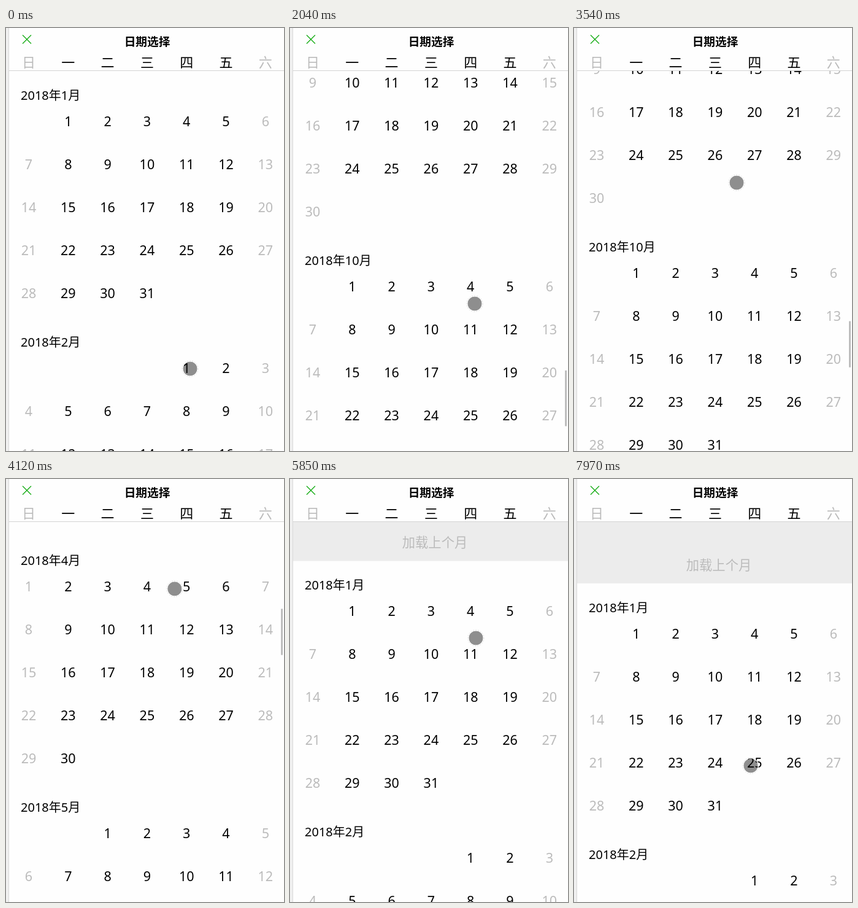
An HTML page with a canvas that plays this animation: 453x689 px, repeating every 8 s.

```html
<!DOCTYPE html>
<html lang="zh">
<head>
<meta charset="utf-8">
<title>日期选择</title>
<style>
html, body { margin: 0; width: 100%; height: 100%; overflow: hidden; background: #fefefe; }
canvas { display: block; width: 453px; height: 689px; }
</style>
</head>
<body>
<canvas id="stage"></canvas>
<script>
const W = 453, H = 689, TOP = 70, VIEW = H - TOP, LOOP = 8000;
const ROW = 70, MONTH_PAD = 52;
const CJK = '"Noto Sans CJK SC Light", "Noto Sans CJK SC", "Noto Sans CJK", sans-serif';
const BOLD = '"Noto Sans CJK SC", "Noto Sans CJK", sans-serif';
const FONT = `"Noto Sans", ${CJK}`;
const BG = '#fefefe', INK = '#000', PALE = '#bbb';

const canvas = document.getElementById('stage');
const ctx = canvas.getContext('2d');
const ratio = window.devicePixelRatio || 1;
canvas.width = W * ratio;
canvas.height = H * ratio;
ctx.scale(ratio, ratio);

const clamp = (v, lo, hi) => Math.min(hi, Math.max(lo, v));
const wave = p => Math.sin(Math.PI * p) ** 2;
const ease = p => wave(clamp(p, 0, 1) / 2);
const lerp = (a, b, p) => a + (b - a) * p;

// Long flings: down the list, settle, slow drag, back to the top
function flings(t) {
  if (t < 2300) return 3683 * ease((t - 800) / 1500);
  if (t < 2600) return lerp(3683, 3490, ease((t - 2300) / 300));
  if (t < 3550) return lerp(3490, 3441, ease((t - 2600) / 950));
  return 3441 * (1 - ease((t - 3550) / 950));
}

// Pulls past the top edge
const PULLS = [
  { at: 600, depth: 25 },
  { at: 4900, depth: 46 },
  { at: 5850, depth: 63.5 },
  { at: 6980, depth: 50 },
  { at: 7970, depth: 100 }
];
const PULL_TIME = 475;

function scrollAt(t) {
  const pulled = PULLS.reduce((sum, p) =>
    sum + p.depth * (1 - ease(Math.abs(t - p.at) / PULL_TIME)), 0);
  return flings(t) - pulled;
}

// Finger stops, with the number of swipes made on the way to the next
const STOPS = [
  { at: 120, x: 300, y: 555, swipes: 5 },
  { at: 2040, x: 301, y: 449, swipes: 1 },
  { at: 3540, x: 265, y: 252, swipes: 4 },
  { at: 4900, x: 288, y: 245, swipes: 1 },
  { at: 5850, x: 303, y: 259, swipes: 1 },
  { at: 6980, x: 282, y: 207, swipes: 1 },
  { at: 7970, x: 288, y: 467 }
];

function touchAt(t) {
  const i = Math.max(1, STOPS.findIndex(s => s.at >= Math.min(t, 7970)));
  const a = STOPS[i - 1], b = STOPS[i];
  const p = clamp((t - a.at) / (b.at - a.at), 0, 1);
  return {
    x: lerp(a.x, b.x, p),
    y: lerp(a.y, b.y, ease(p)) * (1 - 0.45 * wave(a.swipes * p))
  };
}

const months = [];
let total = 0;
for (let m = 0; m < 12; m++) {
  const first = new Date(2018, m, 1).getDay();
  const days = new Date(2018, m + 1, 0).getDate();
  const height = MONTH_PAD + ROW * Math.ceil((first + days) / 7);
  months.push({ name: `2018年${m + 1}月`, first, days, y: total, end: total + height });
  total += height;
}

function loadedMonths(t, scroll) {
  if (t < 2300) return clamp(Math.floor(scroll / 402) + 2, 3, 12);
  return t < 4400 ? 12 : 3;
}

const colX = c => 37 + c * 64.3;
const colInk = c => c % 6 ? INK : PALE;

function text(str, x, y, font, color = INK, align = 'center') {
  ctx.font = font;
  ctx.fillStyle = color;
  ctx.textAlign = align;
  ctx.fillText(str, x, y);
}

function rect(x, y, w, h, color) {
  ctx.fillStyle = color;
  ctx.fillRect(x, y, w, h);
}

function drawList(scroll, count) {
  if (scroll < 0) {
    rect(5, TOP, W - 5, -scroll, '#ececec');
    text('加载上个月', 236, Math.round(TOP - scroll - 22), `300 21.3px ${CJK}`, PALE);
  }
  for (const m of months.slice(0, count)) {
    const y = Math.round(110 + m.y - scroll);
    if (y > H + 20 || y + m.end - m.y < TOP - 20) continue;
    text(m.name, 24, y + 7, `20px ${FONT}`, INK, 'left');
    for (let d = 1; d <= m.days; d++) {
      const cell = m.first + d - 1, c = cell % 7;
      text(d, colX(c), y + 50 + ROW * Math.floor(cell / 7), `21.5px ${FONT}`, colInk(c));
    }
  }
}

function drawHeader() {
  rect(0, 0, W, TOP, BG);
  rect(5, 69, W - 5, 1, '#d4d4d4');
  rect(0, 0, 4, H, '#f0f0f0');
  rect(4, 0, 1, H, '#d8d8d8');
  ctx.strokeStyle = '#1aad19';
  ctx.lineWidth = 1.4;
  ctx.beginPath();
  for (const s of [-7, 7]) {
    ctx.moveTo(34 - s, 11.5);
    ctx.lineTo(34 + s, 25.5);
  }
  ctx.stroke();
  text('日期选择', 230, 29, `bold 18.7px ${BOLD}`);
  [...'日一二三四五六'].forEach((d, c) => text(d, colX(c), 64, `300 22px ${CJK}`, colInk(c)));
}

function drawBar(t, scroll, count) {
  const alpha = Math.min((t - 850) / 60, (5350 - t) / 200, 1);
  if (alpha <= 0) return;
  const content = months[count - 1].end + 134;
  const size = VIEW * VIEW / content;
  const y = 72 + Math.max(0, scroll) / (content - VIEW) * (603 - size);
  ctx.globalAlpha = alpha;
  rect(448, y, 3, size, '#bdbdbd');
  ctx.globalAlpha = 1;
}

function drawTouch({ x, y }) {
  const circle = r => {
    ctx.beginPath();
    ctx.arc(x, y, r, 0, Math.PI * 2);
  };
  const ring = (r, width, color) => {
    circle(r);
    ctx.lineWidth = width;
    ctx.strokeStyle = color;
    ctx.stroke();
  };
  circle(11.6);
  ctx.fillStyle = 'rgba(0,0,0,.44)';
  ctx.fill();
  ring(12.3, 1.2, '#fff');
  ctx.setLineDash([2, 2]);
  ring(13, 0.7, '#cfcfcf');
  ctx.setLineDash([]);
}

function draw(t) {
  const scroll = scrollAt(t);
  const count = loadedMonths(t, scroll);
  rect(0, 0, W, H, BG);
  drawList(scroll, count);
  drawHeader();
  drawBar(t, scroll, count);
  drawTouch(touchAt(t));
}

const start = performance.now();
function tick() {
  draw((performance.now() - start) % LOOP);
  requestAnimationFrame(tick);
}
tick();
</script>
</body>
</html>
```
